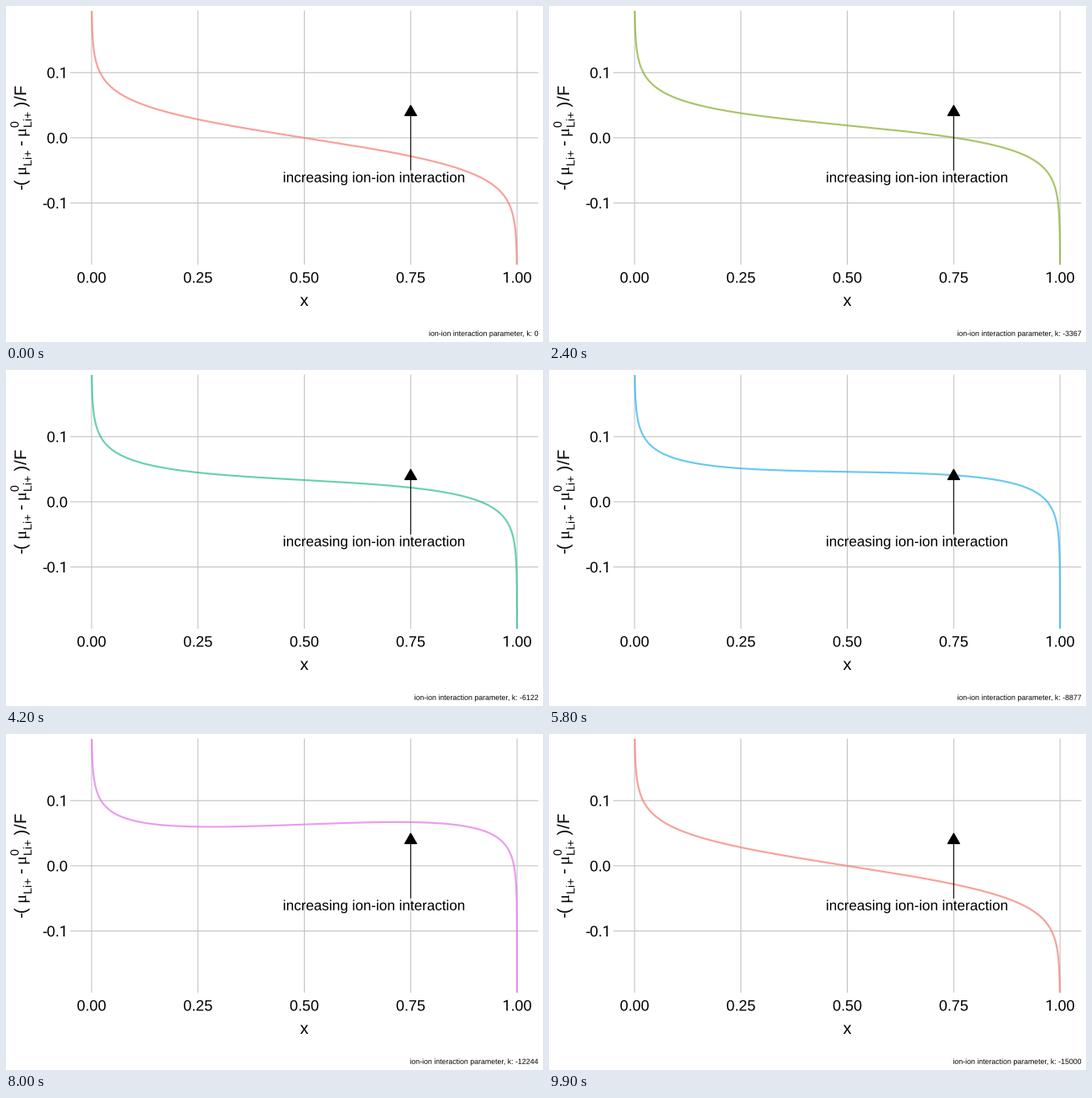
Write a matplotlib script that moves like this. It is 640 by 400 pixels and loops after 10000 ms.

```python
import numpy as np
import matplotlib.pyplot as plt
from matplotlib.animation import FuncAnimation
from matplotlib.patches import PathPatch, Polygon, Rectangle
from matplotlib.path import Path
from matplotlib.textpath import TextPath
from matplotlib.transforms import Affine2D

W, H, DPI = 640, 400, 80
PT = 72 / DPI                       # points per pixel
FRAMES, STATES, K_MAX = 100, 50, 15000
THERMAL, FARADAY = 8.314 * 298.15 / 96485, 96485

LEFT, TOP, RIGHT, BOTTOM = 76.6, 5.5, 634.4, 308.0
X0, X_SPAN = 102.0, 507.1
Y0, Y_SCALE = 156.9, 776.0

plt.rcParams["path.snap"] = False
fig = plt.figure(figsize=(W / DPI, H / DPI), dpi=DPI, facecolor="white")
ax = fig.add_axes([0, 0, 1, 1])
ax.set_xlim(0, W)
ax.set_ylim(H, 0)
ax.axis("off")


def px(x):
    return X0 + X_SPAN * x


def py(y):
    return Y0 - Y_SCALE * y


def place(path, x, y, turn=0):
    return Affine2D().scale(1, -1).rotate_deg(turn).translate(x, y).transform_path(path)


def text_path(s, x, y, size, ha=None, turn=0, family="Liberation Sans"):
    """Outline of s; ha is the anchored share of the ink width."""
    path = TextPath((0, 0), s, size=size, prop={"family": family})
    if ha is not None:
        box = path.get_extents()
        path = Affine2D().translate(-box.x0 - ha * box.width, 0).transform_path(path)
    return place(path, x, y, turn)


def ink(path):
    patch = PathPatch(path, facecolor="black", linewidth=0, zorder=5, snap=False)
    return ax.add_patch(patch)


# footless numeral one, in 2048 units per em
ONE = np.array([(729, 0), (544, 0), (544, 1233), (171, 1097), (171, 1264),
                (700, 1464), (729, 1464)]) / 2048
ADVANCE = {".": 0.27, "-": 0.276}


def tick_label(s, x, y, ha, size=18):
    steps = [ADVANCE.get(c, 0.56) * size for c in s]
    x -= ha * sum(steps)
    for c, step in zip(s, steps):
        if c == "1":
            ink(place(Path(np.vstack([ONE, ONE[:1]]) * size, closed=True), x, y))
        else:
            ink(text_path(c, x, y, size))
        x += step


def hcl(hue, chroma=100, light=65, mute=0.06):
    """Polar LUV to clamped sRGB (D65), muted a little toward its own grey."""
    u = chroma * np.cos(np.radians(hue)) / (13 * light) + 0.19784
    v = chroma * np.sin(np.radians(hue)) / (13 * light) + 0.46834
    y = ((light + 16) / 116) ** 3
    x = y * 9 * u / (4 * v)
    z = y * (12 - 3 * u - 20 * v) / (4 * v)
    m = np.array([[3.2406, -1.5372, -0.4986],
                  [-0.9689, 1.8758, 0.0415],
                  [0.0557, -0.2040, 1.0570]])
    rgb = (1 - mute) * np.clip(m @ (x, y, z), 0, 1) + mute * y
    return 1.055 * rgb ** (1 / 2.4) - 0.055


# grid and tick labels
grid = dict(color="#c2c2c2", linewidth=1.07 * PT, solid_capstyle="butt",
            zorder=1, snap=False)
for v in (0.1, 0, -0.1):
    ax.plot([LEFT, RIGHT], [py(v)] * 2, **grid)
    tick_label(f"{v:.1f}", 73.6, py(v) + 6.5, 1)
for v in (0, 0.25, 0.5, 0.75, 1):
    ax.plot([px(v)] * 2, [TOP, BOTTOM], **grid)
    tick_label(f"{v:.2f}", px(v), 329.4, 0.5)

# axis titles
ink(text_path("x", 355.5, 357, 20, 0.5))
SANS, SERIF = "Liberation Sans", "Liberation Serif"
for s, x, y, size, family in [
        ("-", 24, 219.5, 20, SANS), ("(", 24, 214, 20, SANS),
        ("μ", 24, 201.8, 20, SERIF), ("Li+", 30.5, 190.8, 14, SANS),
        ("-", 24, 167, 20, SANS), ("μ", 24, 156, 20, SERIF),
        ("0", 15, 145, 14, SANS), ("Li+", 30.5, 145, 14, SANS),
        (")", 24, 120.5, 20, SANS), ("/", 24, 113, 20, SANS),
        ("F", 24, 107, 20, SANS)]:
    ink(text_path(s, x, y, size, turn=-90, family=family))

# arrow and its note
tip, tail, ax_x = py(0.05), py(-0.05), px(0.75)
ax.plot([ax_x] * 2, [tail, tip + 4], color="black", linewidth=1.07 * PT,
        solid_capstyle="butt", zorder=4, snap=False)
ax.add_patch(Polygon([(ax_x, tip), (ax_x - 7.2, tip + 12.47), (ax_x + 7.2, tip + 12.47)],
                     facecolor="black", edgecolor="black", linewidth=1.07 * PT,
                     joinstyle="miter", zorder=4, snap=False))
ink(text_path("increasing ion-ion interaction", 438.6, 209.8, 17.07, 0.5))

# potential curve, sampled evenly in log((1 - x) / x)
logit = np.linspace(16, -16, 900)
xs = 1 / (1 + np.exp(logit))
curve, = ax.plot([], [], linewidth=2.13 * PT, alpha=0.7, zorder=3,
                 solid_joinstyle="round", snap=False)
panel = Rectangle((LEFT, TOP), RIGHT - LEFT, BOTTOM - TOP, transform=ax.transData)
curve.set_clip_path(panel)
caption = ink(text_path("k", 0, 0, 8.8))


def update(i):
    # curve leads the caption by one step; one hold is dropped halfway
    late = i > STATES
    state = (i + late) // 2 % STATES
    shown = max(i - 1 + late, 0) // 2
    k = K_MAX * state / (STATES - 1)
    curve.set_data(px(xs), py(THERMAL * logit + k * xs / FARADAY))
    curve.set_color(hcl(15 + 360 * state / STATES))
    label = -int(K_MAX * shown / (STATES - 1))
    caption.set_path(text_path(f"ion-ion interaction parameter, k: {label}",
                               634.2, 392.8, 8.8, 1))
    return curve, caption


anim = FuncAnimation(fig, update, frames=FRAMES, interval=100, repeat=True,
                     repeat_delay=0, blit=False)
plt.show()
```
